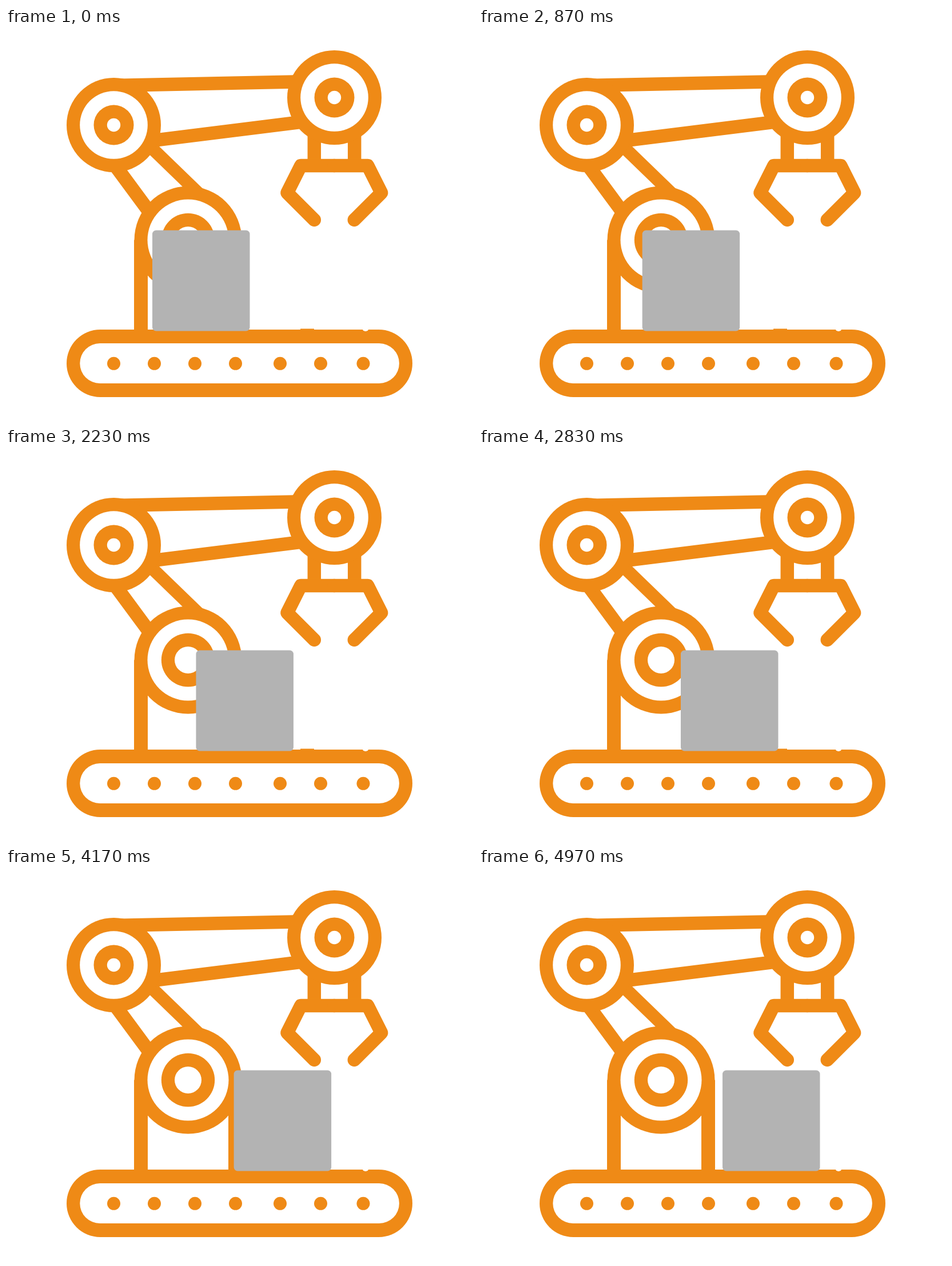
Animation, 817 px wide and 685 px high, one loop 5010 ms. Source, as an HTML page with a canvas:

```html
<!DOCTYPE html>
<html lang="en">
<head>
<meta charset="utf-8">
<title>Robot arm and conveyor</title>
<style>
  html, body { margin: 0; width: 100%; height: 100%; overflow: hidden; background: #fff; }
  canvas { display: block; }
</style>
</head>
<body>
<canvas id="stage" width="817" height="685"></canvas>
<script>
const ctx = document.getElementById('stage').getContext('2d');
const ORANGE = '#ef8a16', GREY = '#b3b3b3', WHITE = '#fff';
const LOOP = 5010, STEPS = 150;
const BAR = 23.5;

function disc(x, y, r, color) {
  ctx.fillStyle = color;
  ctx.beginPath();
  ctx.arc(x, y, r, 0, Math.PI * 2);
  ctx.fill();
}

function bar(x1, y1, x2, y2, width = BAR) {
  ctx.strokeStyle = ORANGE;
  ctx.lineWidth = width;
  ctx.lineCap = 'butt';
  ctx.beginPath();
  ctx.moveTo(x1, y1);
  ctx.lineTo(x2, y2);
  ctx.stroke();
}

function roundBox(x, y, w, h, r, color) {
  ctx.fillStyle = color;
  ctx.beginPath();
  ctx.roundRect(x, y, w, h, r);
  ctx.fill();
}

// A rim and a hub, each an orange disc with a white one inside
function pulley(x, y, rim, rimHole, hub, hubHole) {
  disc(x, y, rim, ORANGE);
  disc(x, y, rimHole, WHITE);
  disc(x, y, hub, ORANGE);
  disc(x, y, hubHole, WHITE);
}

function drawArm() {
  const elbow = { x: 188.5, y: 169.5 }, wrist = { x: 574.5, y: 121.5 };
  const base = { x: 318.5, y: 370.5 };

  // Beams from elbow to wrist
  bar(elbow.x, 100.5, 505, 94);
  bar(245, 198.2, 512, 164.9);
  // Struts from elbow to base
  bar(248, 203, 338, 290, 22);
  bar(190, 239, 249, 318.8, 24);

  for (const side of [-1, 1]) {
    bar(base.x + side * 82.5, base.y, base.x + side * 82.5, 530, 24);
    bar(wrist.x + side * 35.2, 165, wrist.x + side * 35.2, 235);
  }

  pulley(elbow.x, elbow.y, 82.5, 59.3, 35, 11.7);
  pulley(wrist.x, wrist.y, 82.5, 59.3, 35, 11.7);
  pulley(base.x, base.y, 94, 71, 46.7, 23.5);
}

function drawGripper() {
  ctx.strokeStyle = ORANGE;
  ctx.lineWidth = BAR;
  ctx.lineJoin = ctx.lineCap = 'round';
  for (const side of [-1, 1]) {
    const at = dx => 574.3 + side * dx;
    ctx.beginPath();
    ctx.moveTo(at(0), 240.5);
    ctx.lineTo(at(58.5), 240.5);
    ctx.lineTo(at(82.4), 288);
    ctx.lineTo(at(35), 335.3);
    ctx.stroke();
  }
}

function drawBelt() {
  roundBox(106, 527, 605, 118, 59, ORANGE);
  roundBox(129.3, 551, 558.6, 70, 35, WHITE);
  // A raised spot and a nick on the top edge
  bar(515, 527, 539, 527, 3);
  disc(629, 524, 6, WHITE);

  for (const x of [188.5, 259.5, 330.5, 401.5, 479.5, 550.5, 625]) {
    disc(x, 586.3, 11.5, ORANGE);
  }
}

// The crate moves in even steps of a thirtieth of a second, on a 10 ms clock
function crateX(t) {
  const step = Math.min(STEPS - 1, Math.floor((Math.floor(t / 10) + 0.5) * 0.3));
  return 256 + 170 * step / (STEPS - 1);
}

function draw(t) {
  ctx.fillStyle = WHITE;
  ctx.fillRect(0, 0, 817, 685);
  drawArm();
  drawGripper();
  drawBelt();
  roundBox(crateX(t), 353.5, 170.5, 176, 6.5, GREY);
}

let start;
function tick(now) {
  start ??= now;
  draw((now - start) % LOOP);
  requestAnimationFrame(tick);
}
draw(0);
requestAnimationFrame(tick);
</script>
</body>
</html>
```
